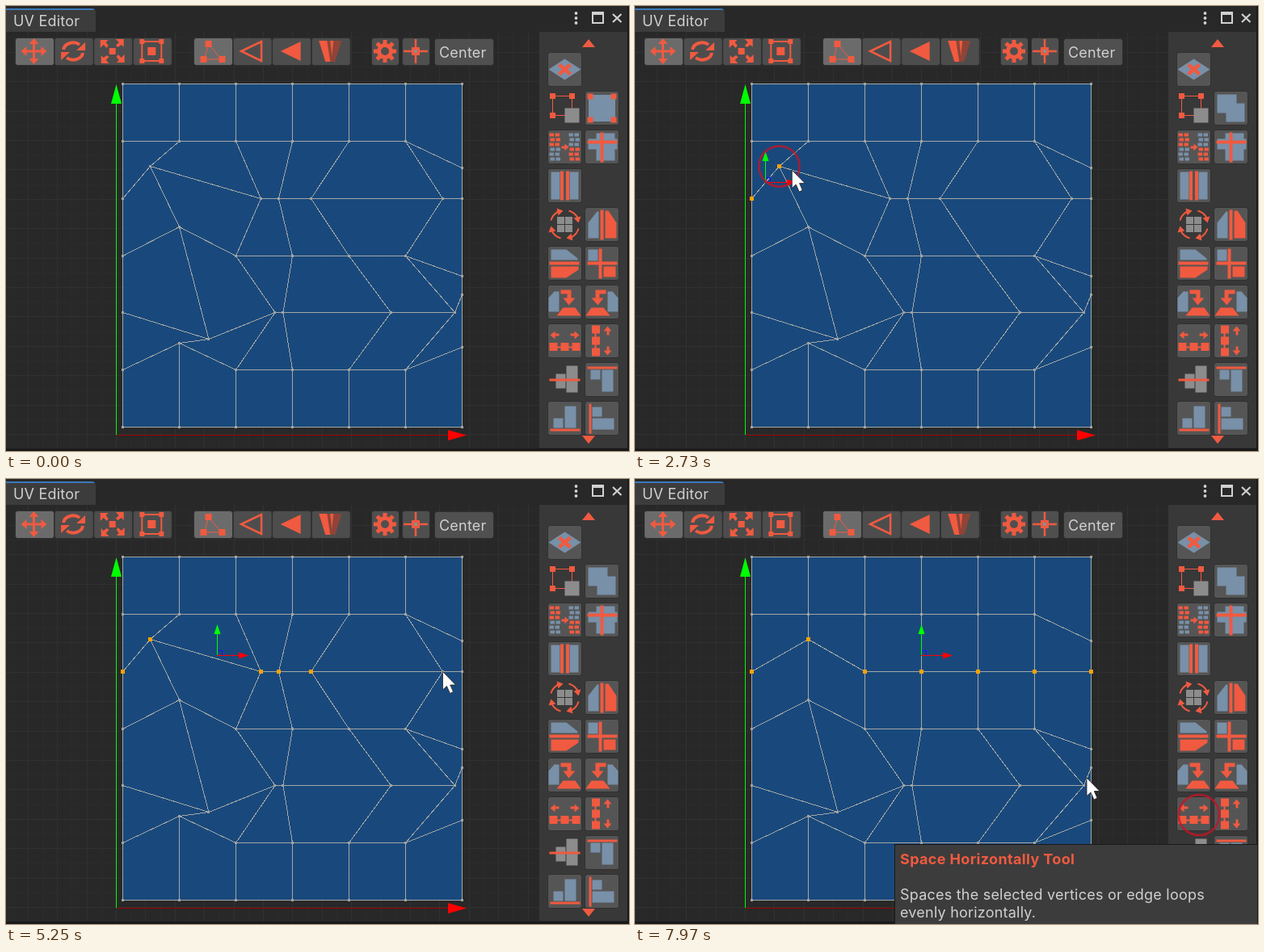
An HTML page for the animation above (8000 ms loop, 771x551 px).

```html
<!DOCTYPE html>
<html lang="en">
<head>
<meta charset="utf-8">
<title>UV Editor</title>
<style>
html, body { margin: 0; width: 100%; height: 100%; overflow: hidden; background: #282828; }
svg { display: block; width: 771px; height: 551px; }
text { font-family: Inter, "Open Sans", sans-serif; font-size: 18px; letter-spacing: .012em; fill: #d0d0d0; }
.title { font-weight: 700; letter-spacing: .02em; fill: #f05a40; }
.r { fill: #f05a40; }
.b { fill: #7890a8; }
.g { fill: #8c8c8c; }
.d { fill: #8f4437; }
.l { fill: none; stroke: #f05a40; stroke-width: 2; }
.crisp { shape-rendering: crispEdges; }
</style>
</head>
<body>
<svg viewBox="0 0 771 551">
  <rect width="771" height="551" fill="#282828"/>
  <path id="minor" class="crisp" stroke="#2b2b2b"/>
  <path id="major" class="crisp" stroke="#313131"/>

  <rect x="144" y="96" width="421" height="426" fill="#184d84" fill-opacity=".92"/>
  <path id="mesh" class="crisp" fill="none" stroke="#a4a7a6"/>
  <path id="dots" class="crisp" fill="#a0a3a3"/>

  <path d="M136.500 531.500H548" class="crisp" stroke="#900"/>
  <path d="M136.500 110V531" class="crisp" stroke="#0f0"/>
  <path d="M136.500 97L143 121H130Z" fill="#0f0"/>
  <path d="M570 531.500L547 525V538Z" fill="red"/>

  <path id="picked" class="crisp" fill="#ffa200"/>
  <g id="gizmo">
    <path d="M.5 0V-28" class="crisp" stroke="#0f0"/>
    <path d="M.5-38L4.500-26H-3.500Z" fill="#0f0"/>
    <path d="M0 .5H29" class="crisp" stroke="red"/>
    <path d="M39 .5L27-3.500V4.500Z" fill="red"/>
    <path d="M.5-5.500H6.500V0" class="crisp" fill="none" stroke="#1414ff"/>
  </g>

  <rect width="771" height="32" fill="#282828"/>
  <path d="M0 3H106Q111 3 111 8V32H0Z" fill="#3c3c3c"/>
  <path d="M0 3H106Q109 3 110 5H0Z" fill="#3a79bb"/>
  <text x="9" y="25">UV Editor</text>
  <g fill="#d0d0d0" stroke="#d0d0d0">
    <path d="M705.500 9V22" stroke-width="3.800" stroke-linecap="round" stroke-dasharray="0 6"/>
    <path fill="none" stroke-width="2" d="M726 8H739V21H726ZM726 10H739"/>
    <path d="M751 10L761.500 20M761.500 10L751 20" stroke-width="2.200"/>
  </g>
  <g id="bar"></g>

  <rect x="660" y="32" width="109" height="515" fill="#383838"/>
  <g id="panel"></g>
  <path class="r" d="M721 41L729 51H713ZM713 532H729L721 542Z"/>
  <path fill="#191919" d="M769 0H771V551H0V548H769Z"/>

  <g id="tip">
    <rect x="321.500" y="452.500" width="449" height="104" fill="#3c3c3c" stroke="#191919"/>
    <text x="328" y="477" class="title">Space Horizontally Tool</text>
    <text x="328" y="521">Spaces the selected vertices or edge loops</text>
    <text x="328" y="543">evenly horizontally.</text>
  </g>
  <circle id="ring" fill="none" stroke="#c81426" stroke-width="2.500"/>
  <path id="cursor" d="M0 0V22.500L5 18L9 27L13 25L9.300 16.500H16Z" fill="#fff" stroke="#222" stroke-width=".8"/>
</svg>
<script>
const $ = id => document.getElementById(id);
const range = n => [...Array(n).keys()];
const rect = (c, x, y, w, h) => `<rect class="${c}" x="${x}" y="${y}" width="${w}" height="${h}"/>`;
const path = (c, d, width = 2) => `<path class="${c}" d="${d}" style="stroke-width:${width}"/>`;
const at = (x, y, s) => `<g transform="translate(${x} ${y})">${s}</g>`;
const spin = (deg, s) => `<g transform="rotate(${deg})">${s}</g>`;
const turn = (n, s) => range(n).map(i => spin(i * 360 / n, s)).join('');
const flip = (sx, sy, s) => `<g transform="scale(${sx} ${sy})">${s}</g>`;
const quad = (c, r, s) => turn(4, rect(c, r - s / 2, r - s / 2, s, s));
const square = (c, s) => rect(c, -s / 2, -s / 2, s, s);
const box = (x, y, w, h, fill) =>
  `<rect x="${x}" y="${y}" width="${w}" height="${h}" rx="3" fill="${fill}" stroke="#303030"/>`;

// Background grid
function gridLines(step) {
  let d = '';
  for (let x = 136.5 % step; x < 660; x += step) d += `M${Math.floor(x) + .5} 32V548`;
  for (let y = 530.5 % step; y < 548; y += step) d += `M0 ${Math.floor(y) + .5}H660`;
  return d;
}
$('minor').setAttribute('d', gridLines(18.2));
$('major').setAttribute('d', gridLines(36.4));

// Top toolbar; every icon is drawn around its centre
const tools = [
  turn(4, path('r', 'M0-16L6-9H1.500V0H-1.500V-9H-6Z', 0)),
  turn(2, path('l', 'M-12-2A12 10 0 0 1 8-8', 4) + path('r', 'M15-11V-1H4Z', 0)),
  square('r', 8) + turn(4, path('r', 'M-15-14H-5L-8-11L-5-7L-7-4L-11-8L-15-4Z', 0)),
  path('l', 'M-12-12H12V12H-12Z') + quad('r', 12, 6) + square('r', 10)
];
const left = 'M-13 0L12-12V12Z';
const modes = [
  path('l', 'M-5-9L-10 10M-5-9L11 10M-10 10H11', 1) +
    [[-5, -9], [-11, 10], [12, 10]].map(p => at(...p, square('r', 8))).join(''),
  path('l', left, 2.5),
  path('r', left, 0),
  path('d', 'M-14-13H14L6 13H-6Z', 0) + path('r', 'M-14-13H-4L0 13H-6ZM0-13H4L2 6Z', 0)
];
const gear = turn(8, rect('r', -2.5, -14, 5, 6)) + '<circle class="l" r="7.500" style="stroke-width:5"/>';
const pivot = path('l', 'M0-15V15M-15 0H15', 2.5) + square('r', 10) + square('g', 4);

const strip = (x, icons) => icons.map((icon, i) =>
  at(x + i * 48.6, 39.5, box(.5, 0, 48, 34, i ? '#4d4d4d' : '#6b6b6b') + at(23.5, 16.5, icon))).join('');
const single = (x, icon) => at(x, 39.5, box(.5, 0, 34, 34, '#4f4f4f') + at(17, 16.5, icon));
$('bar').innerHTML = strip(11, tools) + strip(232, modes) + single(452, gear) + single(490, pivot) +
  box(530.5, 40.5, 73, 33, '#505050') + '<text x="536" y="64">Center</text>';

// Side panel; related icons are turned or mirrored copies
const bricks = (x, flipped) => range(6).map(i => {
  const c = (i < 3) !== flipped ? 'r' : 'b';
  return range(2).map(k => rect(c, x + k * 7 + i % 2, -17 + i * 6, 5.5, 4)).join('');
}).join('');
const halves = path('b', 'M-17 17V-2L-6-16H-4V17Z', 0) + rect('r', -2, -18, 4, 37) +
  path('r', 'M4-17H8L18-2V17H4Z', 0);
const fold = path('b', 'M-20 12V-5L-13-13H-7V12Z', 0) +
  path('r', 'M-5-15H8V-5H13L5 4L-2-5H3V-10H-5ZM-2 7H13L20 17H-10Z', 0);
const spread = range(3).map(i => at(-14 + i * 14, 7.5, square('r', 10))).join('') + rect('r', -15, 7, 30, 2) +
  turn(2, '') + [1, -1].map(s => flip(s, 1, path('r', 'M-18-7L-12-12V-9H-7V-6H-12V-2Z', 0))).join('');
const align = rect('b', -14, 0, 12, 12) + rect('b', 0, -15, 14, 27) + rect('r', -18, 13, 37, 3);
const cycle = quad('g', 5, 9) +
  turn(4, path('l', 'M-17 -5A17.500 17.500 0 0 1 -8-16') + path('r', 'M-10-20L-2-17L-8-11Z', 0));

const panel = [
  [path('b', 'M0-13L20 0L0 13L-20 0Z', 0) + path('l', 'M-7-6L7 6M7-6L-7 6', 4.5)],
  [at(-3, -3, quad('g', 12, 2) + path('l', 'M-12-12H12V12H-12Z', 1) + quad('r', 12, 7)) + rect('g', 0, 0, 18, 18),
    `<g id="island">${square('b', 33) + quad('r', 14.5, 7)}</g>` +
    `<g id="merge">${path('b', 'M-17-17H7V-6H17V17H-6V6H-17Z', 0)}</g>`],
  [bricks(-19, false) + bricks(5, true) + path('r', 'M-4-1H0V-4L5 0L0 5V2H-4Z', 0),
    rect('b', -17, -10, 36, 13) + rect('b', -7, -17, 23, 34) + rect('r', -18, -8, 37, 4) + rect('r', -2, -18, 4, 37)],
  [[1, -1].map(s => flip(s, 1, rect('b', 6, -17, 11, 34) + rect('r', 1.5, -18, 4, 36))).join('')],
  [cycle, halves],
  [spin(90, halves), rect('b', -17, -17, 12, 14) + rect('r', 2, 4, 15, 13) + rect('r', -4, -18, 4, 37) + rect('r', -18, -2, 37, 4)],
  [fold, flip(-1, 1, fold)],
  [spread, spin(90, spread)],
  [rect('g', -11, -7, 12, 18) + rect('g', 2, -17, 14, 33) + rect('r', -19, -1, 38, 3), flip(1, -1, align)],
  [align, spin(90, align)]
];
const bare = [1, 4, 8];
$('panel').innerHTML = panel.map((row, r) => row.map((icon, c) => {
  const bg = c || !bare.includes(r) ? box(.5, .5, 42, 42, '#555') : '';
  const hot = r === 7 && !c ? `<g id="hot">${box(.5, .5, 42, 42, '#686868')}</g>` : '';
  return at(670 + c * 46, 57 + r * 48, bg + hot + at(21.5, 21.5, icon));
}).join('')).join('');

// Mesh: an even grid with some vertices pushed away
const size = 7;
const col = c => 144.5 + c * 70;
const verts = range(size).map(r => range(size).map(c => [col(c), Math.floor(96.5 + r * 70.85) + .5]));
const push = (r, c, dx, dy = 0) => { verts[r][c][0] += dx; verts[r][c][1] += dy; };
const shift = [0, -36, 31, -17, -47, 46, 0];
shift.forEach((dx, c) => push(2, c, dx));
push(2, 1, 0, -40);
[36.5, 48.5, -11.5, 52, 61].forEach((dx, i) => push(4, i + 1, dx));
push(4, 1, 0, 33);
push(3, 1, 0, -36);
push(5, 1, 0, -33);
[33, 0, 25, -22, -28].forEach((dy, i) => push(i + 1, 6, 0, dy));
const row = verts[2], start = row.map(v => v[0]);

const line = pts => 'M' + pts.map(p => p.join(' ')).join('L');
const dot = s => ([x, y]) => `M${Math.floor(x - s / 2)} ${Math.floor(y - s / 2)}h${s}v${s}h${-s}z`;
function drawMesh(even) {
  row.forEach((v, c) => { v[0] = even ? col(c) : start[c]; });
  $('mesh').setAttribute('d', verts.map(line).join('') + range(size).map(c => line(verts.map(r => r[c]))).join(''));
  $('dots').setAttribute('d', verts.flat().map(dot(3)).join(''));
}

// Pointer stops: arrive, leave, point, and how many steps are done once clicked
const loop = 8000;
const vertex = c => [start[c], row[c][1]];
const stops = [
  [70, 70, [393, 299]],
  [560, 600, [140, 113]],
  [840, 1250, vertex(0), 1],
  [1850, 1940, vertex(1), 1],
  [2200, 2200, [202, 206]],
  [2380, 2600, vertex(1), 2],
  [3220, 3500, vertex(2), 3],
  [3820, 4345, vertex(3), 4],
  [4470, 4760, vertex(4), 5],
  [5250, 5950, vertex(5), 6],
  [6080, 6640, vertex(6), 7],
  [7060, 7260, [706, 417]],
  [7330, 7840, [698, 416], 8],
  [7970, loop, [559, 370]]
];
const clicks = stops.filter(s => s[3]);
const press = 150, ringLife = 290;
const ease = k => k * k * (3 - 2 * k);
const show = (el, on) => { el.style.display = on ? '' : 'none'; };
const move = (el, x, y) => el.setAttribute('transform', `translate(${x} ${y})`);

function pointer(t) {
  const i = Math.max(stops.findIndex(s => s[1] >= t), 1);
  const [, from, a] = stops[i - 1], [to, , b] = stops[i];
  const k = ease(Math.min(Math.max((t - from) / (to - from), 0), 1));
  return a.map((v, j) => v + (b[j] - v) * k);
}

function draw(t) {
  const done = Math.max(0, ...clicks.filter(s => t >= s[1] - press).map(s => s[3]));
  const n = Math.min(done, size);
  drawMesh(done > size);
  $('picked').setAttribute('d', row.slice(0, n).map(dot(5)).join(''));
  show($('gizmo'), n);
  if (n) move($('gizmo'), Math.floor((start[0] + start[n - 1]) / 2), n > 1 ? 218 : 238);
  show($('island'), !n);
  show($('merge'), n);
  show($('hot'), t >= 7050 && t < 7880);
  show($('tip'), t >= 7480);

  const click = clicks.find(s => t >= s[1] && t < s[1] + ringLife);
  show($('ring'), click);
  if (click) {
    const age = t - click[1];
    move($('ring'), ...click[2]);
    $('ring').setAttribute('r', 12 + age * .1);
    $('ring').setAttribute('opacity', 1 - (age / ringLife) ** 2);
  }
  show($('cursor'), t >= 70);
  move($('cursor'), ...pointer(t));
}

const began = performance.now();
function tick() {
  draw((performance.now() - began) % loop);
  requestAnimationFrame(tick);
}
tick();
</script>
</body>
</html>
```
